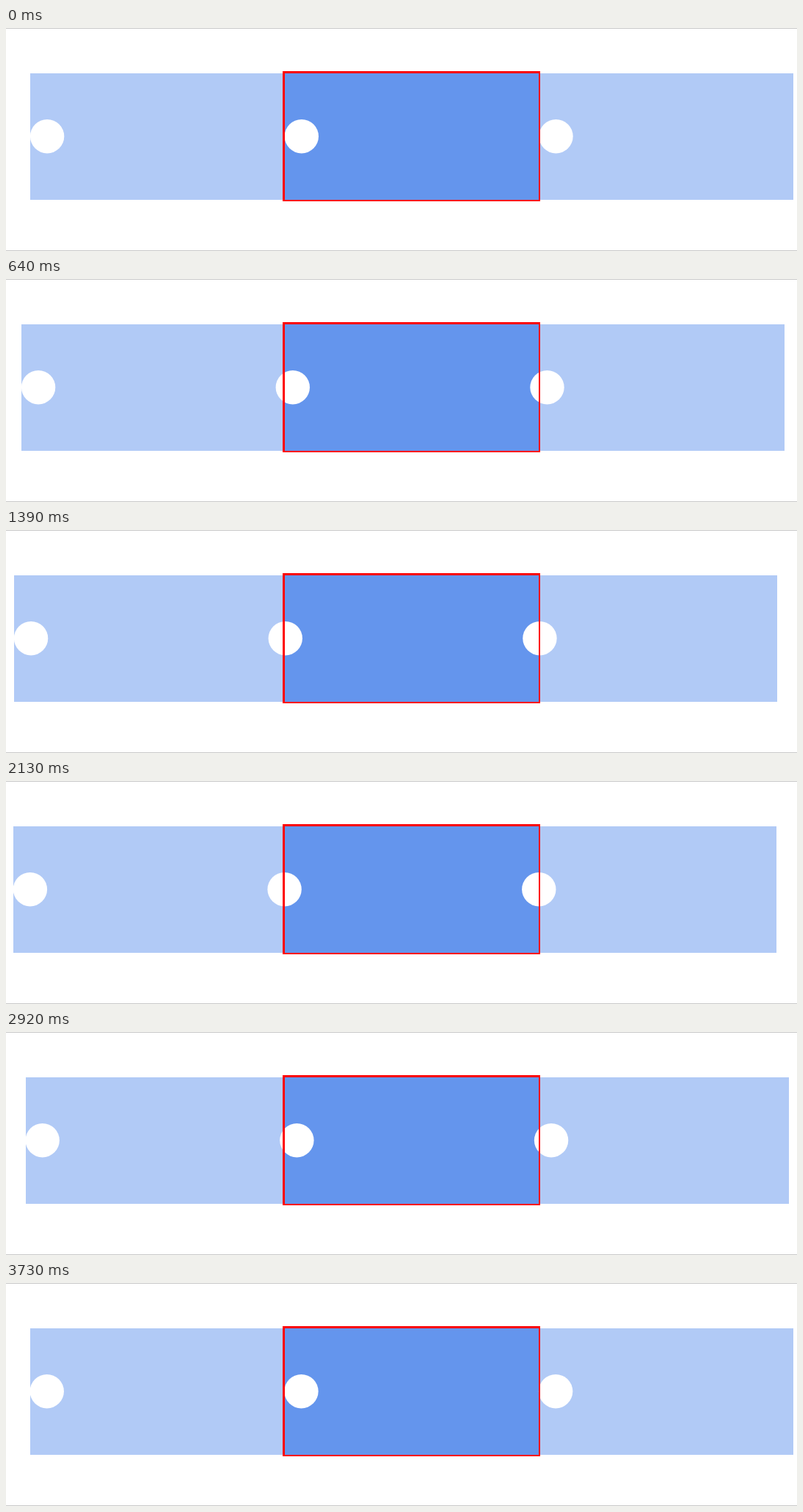
Recreate the animation shown at these times as an HTML page. Size 1078 by 305 pixels, loop 3780 ms.

```html
<!DOCTYPE html>
<html lang="en">
<head>
<meta charset="utf-8">
<title>Sliding strip behind a window</title>
<style>
  html, body { margin: 0; width: 100%; height: 100%; overflow: hidden; background: #fff; }
  svg { display: block; }
</style>
</head>
<body>
<svg width="1078" height="305" viewBox="0 0 1078 305">
  <path d="M0 0h1078v1H0zM0 304h1078v1H0z" fill="#c8c8c8"/>
  <rect id="strip" y="62" width="1040" height="173" fill="#b1caf6"/>
  <rect x="380" y="62" width="346" height="173" fill="#6495ed"/>
  <g id="dots" fill="#fff">
    <circle cx="22.9" cy="148.2" r="23.2"/>
    <circle cx="369.6" cy="148.2" r="23.2"/>
    <circle cx="716.3" cy="148.2" r="23.2"/>
  </g>
  <path d="M377 59H728V237H377zM380 62V235H726V62z" fill="#f00" fill-rule="evenodd"/>
</svg>
<script>
const LOOP = 3780, START = 50, HALF = 2000;
const RIGHT = 33.2, LEFT = 9.4;
const strip = document.getElementById('strip');
const dots = document.getElementById('dots');

const bezier = (a, b, u) => 3 * a * u * (1 - u) ** 2 + 3 * b * u * u * (1 - u) + u ** 3;

// cubic-bezier(.25, .1, .25, 1), solved by bisection
function ease(p) {
  if (p <= 0) return 0;
  if (p >= 1) return 1;
  let lo = 0, hi = 1;
  for (let i = 0; i < 24; i++) {
    const mid = (lo + hi) / 2;
    if (bezier(0.25, 0.25, mid) < p) lo = mid; else hi = mid;
  }
  return bezier(0.1, 1, lo);
}

function draw(now) {
  const t = now % LOOP - START;
  const shift = ease(t / HALF) - ease((t - HALF) / HALF);
  const x = RIGHT + (LEFT - RIGHT) * shift;
  strip.setAttribute('x', Math.round(x));
  dots.setAttribute('transform', `translate(${x} 0)`);
}

const begin = performance.now();
function tick() {
  draw(performance.now() - begin);
  requestAnimationFrame(tick);
}
tick();
</script>
</body>
</html>
```
